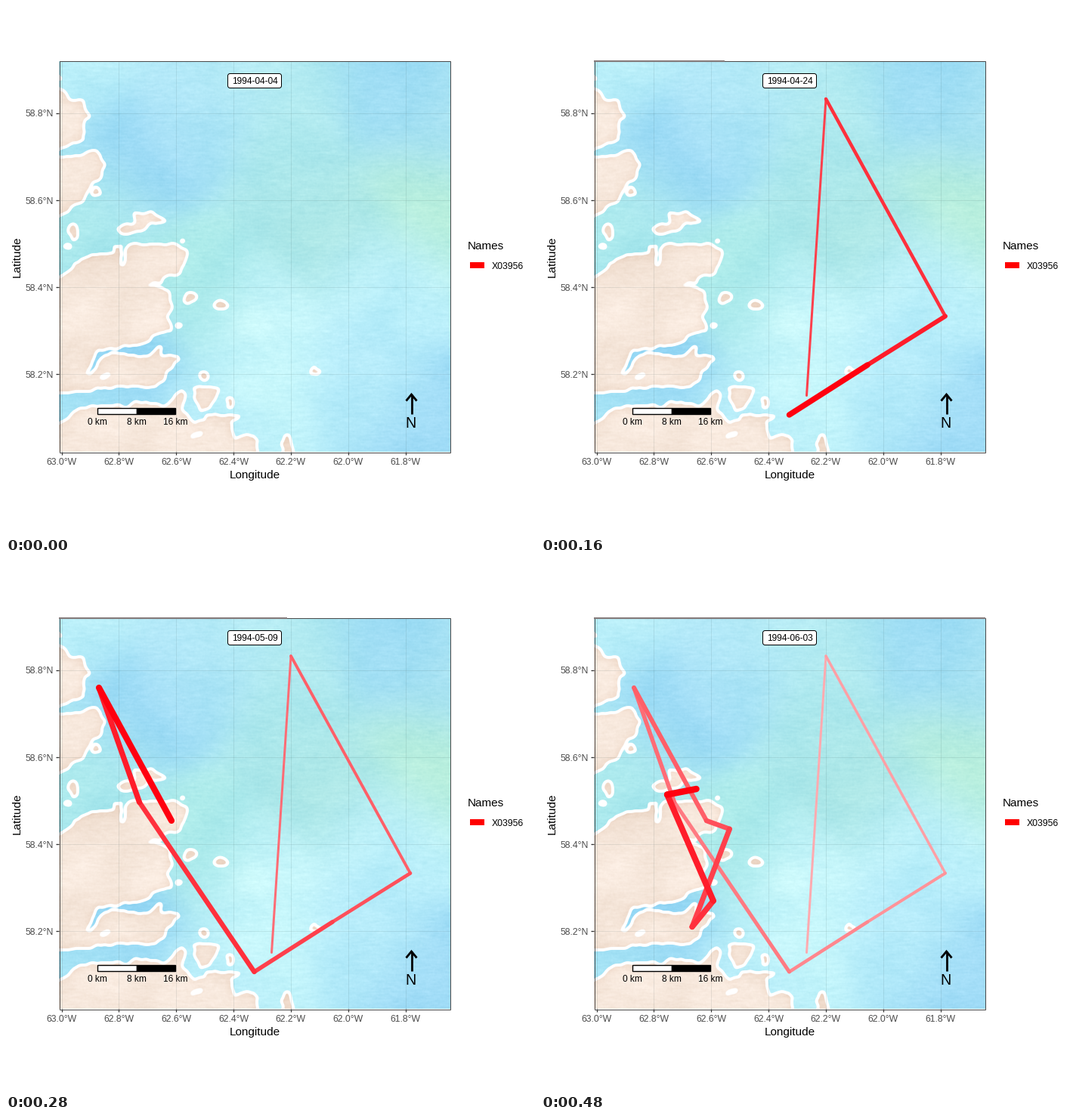
A matplotlib script that plays this animation: 700 px wide and 700 px high, repeating every 520 ms.

```python
import numpy as np
import matplotlib.pyplot as plt
from matplotlib.animation import FuncAnimation
from matplotlib.collections import LineCollection
from matplotlib.colors import to_rgb
from matplotlib.patches import FancyBboxPatch, Rectangle
from matplotlib.path import Path

plt.rcParams["font.family"] = "Liberation Sans"
SIZE, DPI, STEPS = 700, 100, 13
PT = 72 / DPI
LEFT, TOP, RIGHT, BOTTOM = 70, 73, 588, 590

fig = plt.figure(figsize=(SIZE / DPI, SIZE / DPI), dpi=DPI, facecolor="white")
ax = fig.add_axes([0, 0, 1, 1])
ax.axis("off")

# Coastlines in stage pixels
NORTH_CAPE = [(50, 110), (76, 111), (83, 123), (104, 126), (111, 144),
              (104, 160), (103, 178), (76, 188), (50, 188)]
SECOND_CAPE = [(50, 197), (85, 201), (119, 190), (131, 212), (124, 228),
               (108, 241), (103, 258), (82, 271), (76, 277), (50, 283)]
MAINLAND = [(50, 359), (76, 357), (90, 341), (114, 329), (142, 327), (145, 317),
            (190, 315), (228, 317), (241, 325), (231, 353), (208, 358), (206, 366),
            (188, 368), (214, 376), (219, 402), (213, 410), (219, 431), (195, 436),
            (186, 452), (204, 451), (207, 463), (228, 464), (230, 471), (213, 483),
            (213, 493), (196, 505), (145, 504), (95, 511), (50, 514)]
INLET = [(188, 447), (160, 450), (122, 455), (106, 489), (112, 489),
         (128, 464), (140, 458), (186, 464), (203, 451)]
FJORD = [(155, 310), (150, 340), (156, 342), (162, 310)]
SOUTH = [(50, 560), (76, 551), (90, 536), (120, 528), (160, 530), (184, 523),
         (208, 530), (230, 508), (237, 517), (233, 534), (248, 551), (262, 549),
         (266, 541), (310, 543), (297, 553), (301, 570), (326, 567), (334, 575),
         (332, 610), (50, 610)]
BAY_ISLE = [(148, 293), (168, 288), (172, 274), (192, 272), (213, 286),
            (194, 288), (180, 298), (150, 303)]
SOUTH_ISLE = [(246, 503), (282, 506), (279, 516), (268, 532), (259, 537)]
# Small isles: centre and radii
ISLES = [(68, 94.5, 7, 2), (119, 246, 7, 4), (89, 298, 6, 10), (82, 319, 5, 3),
         (234, 311, 2.5, 2), (244, 386, 8, 6), (285, 396, 10, 5), (231, 422, 5, 3.5),
         (262, 488, 7, 5), (296, 526, 5, 7), (372, 590, 7, 22),
         (411, 484, 6, 3), (406, 482, 2.5, 7)]
PONDS = [(131, 489, 7, 2), (253, 566, 7, 2)]

# Washes of sea colour: x, y, tone
WASHES = [(100, 80, "#bbf0fa"), (165, 195, "#96d7f5"), (250, 140, "#b0e7f8"),
          (320, 80, "#b8edf7"), (390, 120, "#b2ebf0"), (500, 110, "#9cdcf5"),
          (575, 160, "#abe4f4"), (390, 220, "#ace8ec"), (555, 262, "#baf0dc"),
          (430, 290, "#ace7e6"), (110, 265, "#aeebee"), (250, 375, "#acebea"),
          (330, 420, "#c6f6fb"), (500, 350, "#bbf0fb"), (340, 500, "#ccfafd"),
          (470, 500, "#b4ebfa"), (560, 570, "#a0dcf7"), (100, 525, "#a5e3f5"),
          (150, 455, "#8fd3f4"), (270, 560, "#b2eaf8")]


def blur(a, sy, sx):
    fy = np.fft.fftfreq(a.shape[0])[:, None]
    fx = np.fft.rfftfreq(a.shape[1])[None, :]
    kernel = np.exp(-2 * np.pi ** 2 * ((sy * fy) ** 2 + (sx * fx) ** 2))
    return np.fft.irfft2(np.fft.rfft2(a) * kernel, a.shape)


def grain(rng, shape, sy, sx):
    n = blur(rng.standard_normal(shape), sy, sx)
    return n / n.std()


def ramp(v, lo, hi):
    t = np.clip((v - lo) / (hi - lo), 0, 1)
    return t * t * (3 - 2 * t)


def watercolour():
    rng = np.random.default_rng(7)
    pad = 20
    gx, gy = np.meshgrid(np.arange(LEFT - pad, RIGHT + pad) + 0.5,
                         np.arange(TOP - pad, BOTTOM + pad) + 0.5)
    shape = gx.shape
    # Ragged shores: sample the outlines at shifted places
    wx = gx + 1.1 * grain(rng, shape, 3.5, 3.5)
    wy = gy + 1.1 * grain(rng, shape, 3.5, 3.5)
    pts = np.column_stack([wx.ravel(), wy.ravel()])

    def inside(poly):
        return Path(poly + poly[:1]).contains_points(pts).reshape(shape)

    def oval(x, y, rx, ry, tilt=0):
        return ((wx - x) / rx) ** 2 + ((wy - y + tilt * (wx - x)) / ry) ** 2 < 1

    mask = np.zeros(shape)
    for poly in (NORTH_CAPE, SECOND_CAPE, MAINLAND, SOUTH, BAY_ISLE, SOUTH_ISLE):
        mask[inside(poly)] = 1
    for isle in ISLES:
        mask[oval(*isle)] = 1
    for cut in (INLET, FJORD):
        mask[inside(cut)] = 0
    for pond in PONDS:
        mask[oval(*pond, tilt=0.4)] = 0

    total = np.zeros(shape)
    sea = np.zeros(shape + (3,))
    for x, y, tone in WASHES:
        w = np.exp(-((gx - x) ** 2 + (gy - y) ** 2) / (2 * 44 ** 2)) + 1e-9
        total += w
        sea += w[..., None] * np.array(to_rgb(tone))
    sea /= total[..., None]
    fibre = 0.6 * grain(rng, shape, 0.9, 3.5) + 0.4 * grain(rng, shape, 0.8, 0.8)
    blotch = grain(rng, shape, 14, 18)
    sea += fibre[..., None] * np.array([0.014, 0.009, 0.007])
    sea += blotch[..., None] * np.array([0.012, 0.006, 0.003])

    near = blur(mask, 2.1, 2.1)
    far = blur(mask, 7, 7)
    land = np.array(to_rgb("#f7e8dc")) - (1 - far)[..., None] * np.array([0.06, 0.11, 0.14])
    land = land + (0.008 * fibre + 0.008 * blotch)[..., None] * np.array([1, 1.3, 1.6])

    out = np.where(near[..., None] > 0.5, land, sea)
    white = ramp(near, 0.10, 0.26) * (1 - ramp(near, 0.74, 0.92))
    out = out * (1 - white[..., None]) + white[..., None]
    return np.clip(out[pad:-pad, pad:-pad], 0, 1)


def text(x, y, s, pt, color="black", ha="center", **kw):
    return ax.text(x, y, s, fontsize=pt, color=color, ha=ha, va="baseline", **kw)


def line(xs, ys, color, px, **kw):
    return ax.plot(xs, ys, color=color, lw=px * PT, **kw)[0]


ax.imshow(watercolour(), extent=(LEFT, RIGHT, BOTTOM, TOP), aspect="auto",
          interpolation="nearest")
ax.set_xlim(0, SIZE)
ax.set_ylim(SIZE, 0)

# Grid, ticks and axis labels
GRID = (0.2, 0.3, 0.3, 0.11)
for i in range(7):
    x = 73.5 + 75.85 * i
    line([x, x], [TOP, BOTTOM], GRID, 1)
    line([x, x], [BOTTOM, BOTTOM + 4], "#333333", 1.3, solid_capstyle="butt")
    text(x, 607, f"{63 - 0.2 * i:.1f}°W", 8.8, "#4d4d4d")
for i in range(4):
    y = 142 + 115.1 * i
    line([LEFT, RIGHT], [y, y], GRID, 1)
    line([LEFT - 4, LEFT], [y, y], "#333333", 1.3, solid_capstyle="butt")
    text(63, y + 4.5, f"{58.8 - 0.2 * i:.1f}°N", 8.8, "#4d4d4d", "right")
text(329, 625, "Longitude", 11)
text(18.5, 332, "Latitude", 11, rotation=90, rotation_mode="anchor")

ax.add_patch(Rectangle((LEFT + 0.5, TOP - 0.5), RIGHT - LEFT - 1, BOTTOM - TOP + 1,
                       fill=False, ec="#4a4a4a", lw=PT, zorder=3))

# Legend
text(611, 322, "Names", 11, ha="left")
ax.add_patch(Rectangle((613.5, 338.5), 19, 8.5, fc="red", lw=0))
text(642.5, 348, "X03956", 8.8, ha="left")

# Scale bar
for i, fill in enumerate(("white", "black")):
    ax.add_patch(Rectangle((121 + 51.5 * i, 531.5), 51.5, 8, fc=fill, ec="black",
                           lw=1.4 * PT, zorder=6))
for i in range(3):
    text(121 + 51.5 * i, 554, f"{8 * i} km", 8.54, zorder=6)

# North arrow
line([536.5, 536.5], [539.5, 514], "black", 2.8, solid_capstyle="butt", zorder=6)
line([529.5, 536.5, 543.5], [522.5, 514, 522.5], "black", 2.8,
     solid_capstyle="butt", solid_joinstyle="miter", zorder=6)
text(536, 558, "N", 14.2, zorder=6)

# Date label
ax.add_patch(FancyBboxPatch((296.5, 92.5), 65, 13, boxstyle="round,pad=3,rounding_size=3",
                            fc="white", ec="black", lw=PT, zorder=6))
date = text(329, 103, "", 8.54, zorder=7)

# Track, one fix every five days
TRACK = np.array([(351.5, 515.5), (377, 123), (535, 410.5), (432, 475), (328.5, 541),
                  (176.5, 316.5), (123, 165), (219, 341), (249.5, 352), (200, 481.5),
                  (228, 447), (167, 306.5), (205.5, 299)])
trail = LineCollection([], capstyle="round", zorder=5)
ax.add_collection(trail, autolim=False)
progress = line([], [], "#857b7b", 2.2, solid_capstyle="butt", zorder=4)
START = np.datetime64("1994-04-04")


def draw(k):
    i = np.arange(k)
    age = k - i
    fade = 0.67 * ((age - 1) / (STEPS - 2)) ** 0.75
    trail.set_segments([TRACK[j:j + 2] for j in i])
    trail.set_linewidths((3 + 6 * i / max(k, 1)) * PT)
    trail.set_color([(1, f, 0.06 + 0.94 * f) for f in fade])
    progress.set_data([LEFT, LEFT + (RIGHT - LEFT) * k / (STEPS - 1)], [73.3, 73.3])
    date.set_text(str(START + 5 * k))
    return trail, progress, date


anim = FuncAnimation(fig, draw, frames=STEPS, interval=40, repeat=True, repeat_delay=0)
plt.show()
```
